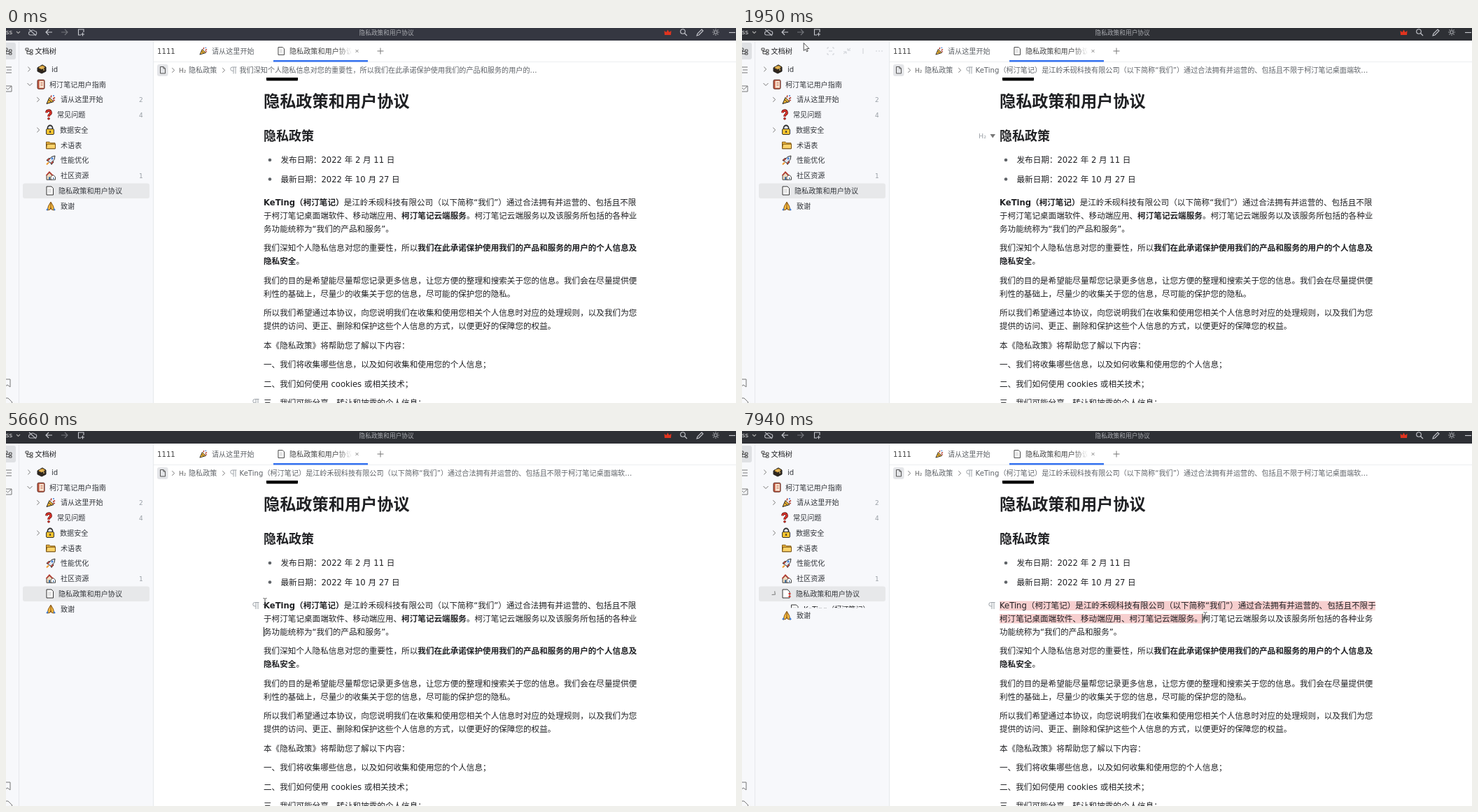
Recreate the animation shown at these times as an HTML page. Size 1043 px wide and 537 px high, loop 8000 ms.

```html
<!DOCTYPE html>
<html lang="zh-CN">
<head>
<meta charset="utf-8">
<style>
html, body { margin: 0; width: 100%; height: 100%; overflow: hidden; background: #fff; }
svg { display: block; width: 1043px; height: 537px; }
text { font-family: "DejaVu Sans", "Noto Sans CJK SC", "Noto Sans CJK", sans-serif; white-space: pre; }
.b { font-weight: bold; }
.shadow { filter: drop-shadow(0 1px 4px rgba(0, 0, 0, .16)); }
</style>
</head>
<body>
<svg id="stage" viewBox="0 0 1043 537"></svg>
<script>
const INK = '#202124', GREY = '#5f6368', PALE = '#9aa0a6', BLUE = '#3573f0';
const UI = 10.15, BODY = 11.6, ROW = 21.75;

// Markup helpers; text is placed by the vertical centre of its line.
const text = (x, cy, s, size = UI, fill = INK, more = '') =>
  `<text x="${x}" y="${cy + size * .38}" font-size="${size}" fill="${fill}" ${more}>${
    s.replace(/\*(.+?)\*/g, '<tspan class="b">$1</tspan>')}</text>`;
const rect = (x, y, w, h, fill, more = '') =>
  `<rect x="${x}" y="${y}" width="${w}" height="${h}" fill="${fill}" ${more}/>`;
const path = (d, stroke = GREY, fill = 'none', more = '') =>
  `<path d="${d}" stroke="${stroke}" fill="${fill}" ${more}/>`;
const disc = (x, y, r, fill, more = '') => `<circle cx="${x}" cy="${y}" r="${r}" fill="${fill}" ${more}/>`;
const at = (x, y, s, more = '') => `<g transform="translate(${x} ${y})" ${more}>${s}</g>`;
const group = (id, s, more = '') => `<g id="${id}" ${more}>${s}</g>`;

const icons = {
  box: path('M-6-2L1-6 6-3V3L0 6-6 3Z', '#222', '#30261c') + path('M-6-2L0 1 6-3 1-6Z', '#222', '#d9a441') + path('M-3-4L3-1V2', '#f3d27c'),
  book: rect(-5, -6.5, 10, 13, '#c2573f', 'rx="1.5" stroke="#5b2b22"') + rect(-2.5, -5, 6.5, 10, '#f6e2cf') + path('M-.5-2H2.5M-.5 1H2.5', '#c2573f'),
  popper: path('M-6 6L-2-3 4 3Z', '#222', '#f2b632') + path('M-3 0L1 4', '#222') + path('M0-3L1-6M3-1L6-3M3 1L6 1', '#b03a2e', 'none', 'stroke-width="1.6"') + disc(4, -5.5, 1, '#3c7dd9'),
  question: path('M-3-3A3 3 0 1 1 1.5-.5Q0 .5 0 2.5', '#5b1512', 'none', 'stroke-width="3.6"') + path('M-3-3A3 3 0 1 1 1.5-.5Q0 .5 0 2.5', '#d9342b', 'none', 'stroke-width="2.2"') + disc(0, 5.5, 1.5, '#d9342b', 'stroke="#5b1512" stroke-width=".6"'),
  lock: path('M-3.5 0V-3a3.5 3.5 0 0 1 7 0V0', '#333', 'none', 'stroke-width="1.8"') + rect(-5.5, -1.5, 11, 8, '#f2c230', 'rx="1.5" stroke="#333"') + path('M0 1V4', '#333', 'none', 'stroke-width="1.6"'),
  folder: path('M-6.5 5V-4.5H-2L-.5-3H6V5Z', '#7a5312', '#f0b83d') + path('M-6.5 5L-5.5-1.5H6.5V5Z', '#7a5312', '#fbd36a'),
  rocket: path('M-4 1L1-5 6-6.5 5-1 0 4Z', '#333', '#dfe6ee') + path('M-4 1L-6 0-3-3-1-2.5M0 4L1 6 4 2.5 3 1', '#333', '#d9463a') + disc(2, -2.5, 1.4, '#3c7dd9') + path('M-3 3L-6 6', '#f09a2c', 'none', 'stroke-width="2"'),
  houses: path('M-6 6V0L-2-4 2 0V6Z', '#444', '#f0dcc0') + path('M0 6V2L3-1 6.500 2V6Z', '#444', '#fff') + path('M-6.500 0L-2-5 3 0', '#b5382d', 'none', 'stroke-width="1.6"') + rect(-3, 2, 2, 4, '#3c6e9f') + rect(3, 3, 1.5, 2, '#3c6e9f'),
  doc: path('M-4.500-6H2.500L5-3.500V6H-4.500Z', '#333', '#fff') + path('M-2.500-2H2.500M-2.500 0H2.500M-2.500 2H2.500', '#bbb', 'none', 'stroke-width=".8"'),
  tabs: path('M-5-6H2L5-3V6H-5Z', '#333', '#fff') + rect(3.500, -1, 3, 2, '#d9342b') + rect(3.500, 3, 3, 2, '#d9342b'),
  pray: path('M-5 6L-3.500 0 0-6 3.500 0 5 6 1 5 0 2-1 5Z', '#80531a', '#f5b83d') + path('M0-5V2', '#80531a') + path('M-6 6L-4 3.500M6 6L4 3.500', '#3c7dd9', 'none', 'stroke-width="2"'),
  pilcrow: path('M4.500-4.500H-1.500a2.700 2.700 0 0 0 0 5.400H0M0-4.500V5M3-4.500V5', PALE),
  tree: path('M-5-4H-1V-1H-5ZM1.500-2H5V1H1.500ZM1.500 2.500H5V5H1.500ZM-3-1V4H1.500M-3 .5H1.500', '#444'),
  chevron: path('M-1.700-3.300L1.700 0-1.700 3.300', '#777'),
  plus: path('M-4.500 0H4.500M0-4.500V4.500', '#777')
};
const icon = (name, x, y, scale = 1) => at(x, y, `<g transform="scale(${scale})">${icons[name]}</g>`);

// Left tree: icon, icon x, label x, label, count, chevron x
const rows = [
  ['box', 51, 65, 'id', '', 33], ['book', 50, 62, '柯汀笔记用户指南', '', 0],
  ['popper', 64, 78, '请从这里开始', 2, 46], ['question', 61, 73, '常见问题', 4, 0],
  ['lock', 63, 77, '数据安全', '', 46], ['folder', 64, 78, '术语表', '', 0],
  ['rocket', 64, 78, '性能优化', '', 0], ['houses', 64, 78, '社区资源', 1, 0]
];
const rowY = i => 59 + i * ROW;
const treeRow = ([name, ix, lx, label, count, chev], i) =>
  icon(name, ix, rowY(i)) + text(lx, rowY(i), label, UI, '#33363b') + text(190, rowY(i), `${count}`, 9, PALE) +
  (chev ? icon('chevron', chev, rowY(i)) : '');

const tree = rect(0, 18, 211, 519, '#f7f8fb') + path('M18.500 18V537M210.500 18V537', '#e6e8ec') +
  rect(-4, 21, 18, 24, '#dfe1e4', 'rx="3"') + icon('tree', 3, 33) +
  path('M-2 56H8M1 60H8M-2 64H8', '#777') + path('M-3 83H8V91H-3ZM-3 83L2.500 88 8 83', '#777') +
  path('M-2 503H6V514L2 511-2 514Z', '#777') + path('M-4 530H3L9 536 4 541', '#777') +
  icon('tree', 33, 33) + text(41.500, 33, '文档树') +
  group('treeTools', path('M122 30V28H124M129 28H131V30M131 36V38H129M124 38H122V36M124 33H129M145 37L149 34V37M145 34H149M155 29L151 32V29M151 32H155M173 29V37M191 33H193M195 33H197M199 33H201', '#cdd0d5')) +
  rect(24, 222.500, 181, 21.500, '#e7e8ea', 'rx="3"') +
  group('hover', rect(24, -10.500, 181, 21.500, '#dfe0e2', 'rx="3"') + path('M155-3.500V-2M155-.7V.7M155 2V3.500', GREY) + icon('plus', 173.500, 0)) +
  path('M30.500 79L34 82.500 37.500 79', '#777') + rows.map(treeRow).join('') +
  group('plainDoc', icon('doc', 62.500, 233) + text(75, 233, '隐私政策和用户协议', UI, '#33363b')) +
  group('openDoc', icon('tabs', 63, 233) + text(77, 233, '隐私政策和用户协议', UI, '#33363b') + `<g id="twist">${icons.chevron}</g>` +
    `<clipPath id="childClip"><rect id="childBox" x="24" y="244" width="187"/></clipPath>` +
    `<g clip-path="url(#childClip)">${icon('doc', 75, 255)}${text(88, 255, 'KeTing（柯汀笔记）')}</g>`) +
  group('thanks', icon('pray', 64, 255) + text(78, 255, '致谢', UI, '#33363b'));

// First paragraph: plain and marked layouts
const LINES = [250, 269, 287.700];
const intro = fill => [
  '*KeTing（柯汀笔记）*是江岭禾砚科技有限公司（以下简称“我们”）通过合法拥有并运营的、包括且不限',
  '于柯汀笔记桌面端软件、移动端应用、*柯汀笔记云端服务*。柯汀笔记云端服务以及该服务所包括的各种业',
  '务功能统称为“我们的产品和服务”。'
].map((s, i) => text(368, LINES[i], s, BODY, fill)).join('');
const marked = rect(368, 243.500, 537, 13.500, '#f7cfcf') + rect(368, 262, 290, 13.500, '#f7cfcf') + [
  'KeTing（柯汀笔记）是江岭禾砚科技有限公司（以下简称“我们”）通过合法拥有并运营的、包括且不限于',
  '柯汀笔记桌面端软件、移动端应用、柯汀笔记云端服务。柯汀笔记云端服务以及该服务所包括的各种业务',
  '功能统称为“我们的产品和服务”。'
].map((s, i) => text(368, LINES[i], s, BODY)).join('');

const body = [
  [315, '我们深知个人隐私信息对您的重要性，所以*我们在此承诺保护使用我们的产品和服务的用户的个人信息及*'],
  [334, '*隐私安全*。'],
  [361.500, '我们的目的是希望能尽量帮您记录更多信息，让您方便的整理和搜索关于您的信息。我们会在尽量提供便'],
  [380.500, '利性的基础上，尽量少的收集关于您的信息，尽可能的保护您的隐私。'],
  [408, '所以我们希望通过本协议，向您说明我们在收集和使用您相关个人信息时对应的处理规则，以及我们为您'],
  [427, '提供的访问、更正、删除和保护这些个人信息的方式，以便更好的保障您的权益。'],
  [454.500, '本《隐私政策》将帮助您了解以下内容：'],
  [482, '一、我们将收集哪些信息，以及如何收集和使用您的个人信息；'],
  [509.500, '二、我们如何使用 cookies 或相关技术；'],
  [536.500, '三、我们可能分享、转让和披露的个人信息；']
];
const selRects = '<rect class="sel1" x="368" y="240.5" height="19"/><rect class="sel2" x="368" y="259" height="19"/>';

const tools = ['((', '∞', 'A', 'B', 'I', 'U', 'S', '▰', 'x²', 'x₂', '⌫', '‹›', '⌘', '#', '∑', '✎', '⋯'];
const editor = rect(211, 18, 832, 519, '#fff') +
  rect(372, 70, 45, 5.500, '#000', 'rx="1"') + text(368, 104, '*隐私政策和用户协议*', 23.200) + text(368, 154.500, '*隐私政策*', 17.980) +
  disc(377, 189, 2.300, GREY) + text(392.500, 189, '发布日期：2022 年 2 月 11 日', BODY) +
  disc(377, 216.500, 2.300, GREY) + text(392.500, 216.500, '最新日期：2022 年 10 月 27 日', BODY) +
  group('plainIntro', intro(INK)) + group('markedIntro', marked) +
  `<clipPath id="selClip">${selRects}</clipPath>` +
  group('selection', `<g fill="#3390f8">${selRects}</g><g clip-path="url(#selClip)">${intro('#fff')}</g>`) +
  body.map(([y, s]) => text(368, y, s, BODY)).join('') +
  group('gutterP', icons.pilcrow) +
  group('gutterH', text(338, 154.500, 'H₂', 9.500, PALE) + path('M354.500 152H362L358.200 157.500Z', 'none', '#777')) +
  `<rect id="caret" width="1" height="13.5" fill="#222"/>` +
  group('toolbar', rect(622.500, 225.500, 308, 15.500, '#fff', 'rx="2" stroke="#dddfe3"') +
    tools.map((s, i) => text(631.500 + i * 18.100, 233.500, s, 9, GREY, 'text-anchor="middle"')).join(''));

const tabs = rect(211, 18, 832, 53, '#fff') + path('M211 48.500H1043', '#eceef1') +
  text(216, 33, '1111', UI, '#444') + icon('popper', 282, 33, .85) + text(294, 33, '请从这里开始', UI, GREY) +
  icon('doc', 393, 33, .9) + text(405, 33, '隐私政策和用户协议', UI, '#444') +
  rect(474, 22, 20, 22, 'url(#fade)') + rect(494, 22, 24, 22, '#fff') +
  path('M499.500 31L503.500 35M503.500 31L499.500 35', '#888') + icon('plus', 535, 33) + rect(382, 46, 135, 2.500, BLUE) +
  rect(216, 52, 15.500, 17, '#e4e5e8', 'rx="3"') + path('M220.500 55.500H225L227.500 58V65H220.500ZM225 55.500V58H227.500', '#555') +
  icon('chevron', 239, 60.500) + text(247, 60.500, 'H₂', 9, '#666') + icon('chevron', 311, 60.500) + icon('pilcrow', 325, 60.500) +
  group('crumbs', text(261, 60.500, '隐私政策', UI, GREY) +
    group('crumbA', text(333.500, 60.500, '我们深知个人隐私信息对您的重要性，所以我们在此承诺保护使用我们的产品和服务的用户的…', UI, GREY)) +
    group('crumbB', text(333.500, 60.500, 'KeTing（柯汀笔记）是江岭禾砚科技有限公司（以下简称“我们”）通过合法拥有并运营的、包括且不限于柯汀笔记桌面端软…', UI, GREY)));

const topbar = `<rect id="bar" width="1043" height="18"/>` +
  text(-5, 6, 'sss', 9, '#ddd') + `<g stroke-width="1.1">` + path('M15 5L17.500 7.500 20 5', '#aaa') +
  path('M35 10A2.500 2.500 0 0 1 35 5A3.500 3.500 0 0 1 41 4.500A2.700 2.700 0 0 1 41 10ZM33 2L43 11', '#b8bac0') +
  path('M66 6H57M61 2L57 6 61 10', '#c8cad0') + path('M79 6H88M84 2L88 6 84 10', '#74767c') +
  path('M107 10H103.500V2H111V6M107 9H112M109.500 6.500V11.500', '#c8cad0') +
  text(504.500, 6.500, '隐私政策和用户协议', 8.700, '#a9abb0') +
  path('M941 10L940.500 4 943.500 6 945.500 2.500 947.500 6 950.500 4 950 10Z', 'none', '#e0341f') +
  disc(967, 5, 3.300, 'none', 'stroke="#c8cad0"') + path('M969.500 7.500L973 11', '#c8cad0') +
  path('M987 11L988 8 994 2 996 4 990 10Z', '#c8cad0') +
  disc(1014, 6, 2.200, 'none', 'stroke="#a9abb0"') + path('M1014 1V2.500M1014 9.500V11M1009 6H1010.500M1017.500 6H1019M1010.500 2.500L1011.500 3.500M1016.500 8.500L1017.500 9.500M1010.500 9.500L1011.500 8.500M1016.500 3.500L1017.500 2.500', '#a9abb0') +
  path('M1033 6.500H1042', '#c8cad0') + '</g>';

const toggle = (y, on) => rect(171, y - 4, 20, 8, on ? '#86a9f4' : '#e3e4e7', 'rx="4"') +
  disc(on ? 188.500 : 175.500, y, 5.800, on ? BLUE : '#fff', on ? '' : 'stroke="#ebecef" stroke-width=".7"');
const options = [[146, '闪卡样式增强'], [167.500, '复习挖空增强'], [189, '类dompelo复习界面'], [211, '层级闪卡'],
  [251, '内置卡包制卡'], [273, '数学块遮挡制卡'], [294.500, '沉浸式制卡'], [316, '渐进式阅读']];
const panel = rect(-6, 18, 219, 324, '#f7f8fa', 'rx="4" class="shadow"') + path('M0 24.500H207.500V334.500H0', '#eceef1') +
  text(10, 57, '管理界面', 13.800) + text(10, 88, '*危险功能*', 11.200) + text(10, 106, '清除当页闪卡') +
  rect(155, 96, 36.500, 20, '#f6cdcd', 'rx="3"') + text(161, 106, 'warn', UI, '#4a3030') +
  text(10, 128, '*美化功能*', 11.200) + text(10, 233, '*实验功能*', 11.200) +
  options.map(([y, s]) => text(10, y, s, UI, '#33363b') + toggle(y, y === 251)).join('') +
  group('lastOn', rect(168, 309, 28, 14, '#f7f8fa') + toggle(316, true));

const pointer = group('cursor',
  group('press', disc(0, 0, 8, '#ffe93b', 'opacity=".8"')) +
  group('arrow', path('M0 0V11L2.600 8.800 4.300 12.400 6 11.600 4.300 8.100H7.800Z', '#222', '#fff', 'stroke-width=".8"')) +
  group('hand', path('M-1.200 7V1.200a1.200 1.200 0 0 1 2.400 0V5L5.700 6q1.300.4 1.200 1.800L6 13H0L-3.500 8q-.4-1.300 1-1.300Z', '#222', '#fff')) +
  group('ibeam', path('M-2.500-4.500Q0-4.500 0-3.500Q0-4.500 2.500-4.500M0-3.500V3.500M-2.500 4.500Q0 4.500 0 3.500Q0 4.500 2.500 4.500', '#555')));

stage.innerHTML = '<defs><linearGradient id="fade"><stop stop-color="#fff" stop-opacity="0"/><stop offset="1" stop-color="#fff"/></linearGradient></defs>' +
  editor + tabs + tree + group('panel', panel) + topbar + pointer;

// Pointer path: time, x, y
const route = [
  [130, 1008, 528], [450, 820, 470], [700, 560, 330], [920, 403, 268], [1000, 403, 268], [1130, 330, 160],
  [1210, 195, 124], [1270, 146, 100], [1500, 80, 60], [1740, 60, 30], [1810, 60, 25], [2010, 100, 20],
  [2150, 107, 8], [2290, 107, 8], [2550, 150, 150], [2820, 192, 287], [3030, 184, 315], [3360, 184, 315],
  [3600, 235, 305], [3970, 340, 297], [4370, 340, 297], [4700, 365, 260], [4980, 415, 233], [5190, 415, 233],
  [5420, 520, 236], [5660, 370, 244], [5940, 370, 245], [6280, 662, 264], [8000, 662, 264]
];
const pointerAt = t => {
  const i = Math.max(1, route.findIndex(k => k[0] >= t));
  const [a, b] = [route[i - 1], route[i]];
  const p = Math.max(0, (t - a[0]) / (b[0] - a[0]));
  return [a[1] + (b[1] - a[1]) * p, a[2] + (b[2] - a[2]) * p];
};
const el = id => document.getElementById(id);
const show = (id, on) => el(id).style.display = on ? '' : 'none';
const move = (id, x, y, more = '') => el(id).setAttribute('transform', `translate(${x} ${y}) ${more}`);
const setWidth = (cls, w) => document.querySelectorAll(cls).forEach(r => r.setAttribute('width', w));
const within = (t, a, b) => t >= a && t < b;

const blocks = [250, 315, 361.500, 408, 454.500, 482, 509.500, 536];
// Insertion point: start, end, x, y
const carets = [[1000, 2290, 402.300, 268.500], [4110, 5940, 368, 287.500], [5940, 6000, 368, 250], [7740, 8000, 657.500, 268.500]];

function draw(t) {
  const [x, y] = pointerAt(t);
  const inTree = within(t, 1170, 2150) && x < 211 && y > 18;
  const inEditor = x > 213 && y > 71;

  el('bar').setAttribute('fill', t < 1000 ? '#353741' : '#2e3035');
  show('crumbs', !within(t, 7740, 7880));
  show('crumbA', t < 1000);
  show('crumbB', t >= 1000);

  show('cursor', t >= 130);
  move('cursor', x, y);
  show('press', within(t, 1000, 1070) || within(t, 3200, 3360) || within(t, 4110, 4180) || within(t, 5940, 6580));
  show('ibeam', inEditor);
  show('hand', inTree && y > 48);
  show('arrow', !inEditor && !(inTree && y > 48));

  const [hx, hy] = pointerAt(t - 60);
  const row = Math.round((hy - 59) / ROW);
  show('treeTools', inTree);
  show('hover', inTree && hx < 205 && row >= 0);
  move('hover', 0, rowY(row));

  show('panel', within(t, 2290, 4110));
  show('lastOn', t >= 3360);

  const gutterY = t < 130 ? 536 : t < 1110 ? blocks.filter(b => b - 10 <= y).pop() || 250 : 250;
  show('gutterP', t < 1110 || within(t, 3500, 5940) || t >= 7740);
  move('gutterP', 357, gutterY);
  show('gutterH', within(t, 1110, 3500));

  const caret = carets.find(c => within(t, c[0], c[1]));
  show('caret', caret && (t - caret[0]) % 1060 < 530);
  if (caret) move('caret', caret[2], caret[3] - 6.700);

  const chars = Math.round((x - 368) / BODY) * BODY;
  const second = y >= 259;
  show('selection', within(t, 5960, 7740));
  setWidth('.sel1', second ? 535 : Math.max(0, chars));
  setWidth('.sel2', second ? Math.max(0, chars) : 0);
  show('toolbar', within(t, 6940, 7460));
  show('plainIntro', t < 7740);
  show('markedIntro', t >= 7740);

  const open = Math.max(0, (t - 7880) / 145);
  show('plainDoc', t < 7880);
  show('openDoc', t >= 7880);
  el('childBox').setAttribute('height', ROW * open);
  move('twist', 46, 233, `rotate(${90 * open})`);
  move('thanks', 0, ROW * open);
}
const tick = () => {
  draw(performance.now() % 8000);
  requestAnimationFrame(tick);
};
tick();
</script>
</body>
</html>
```
